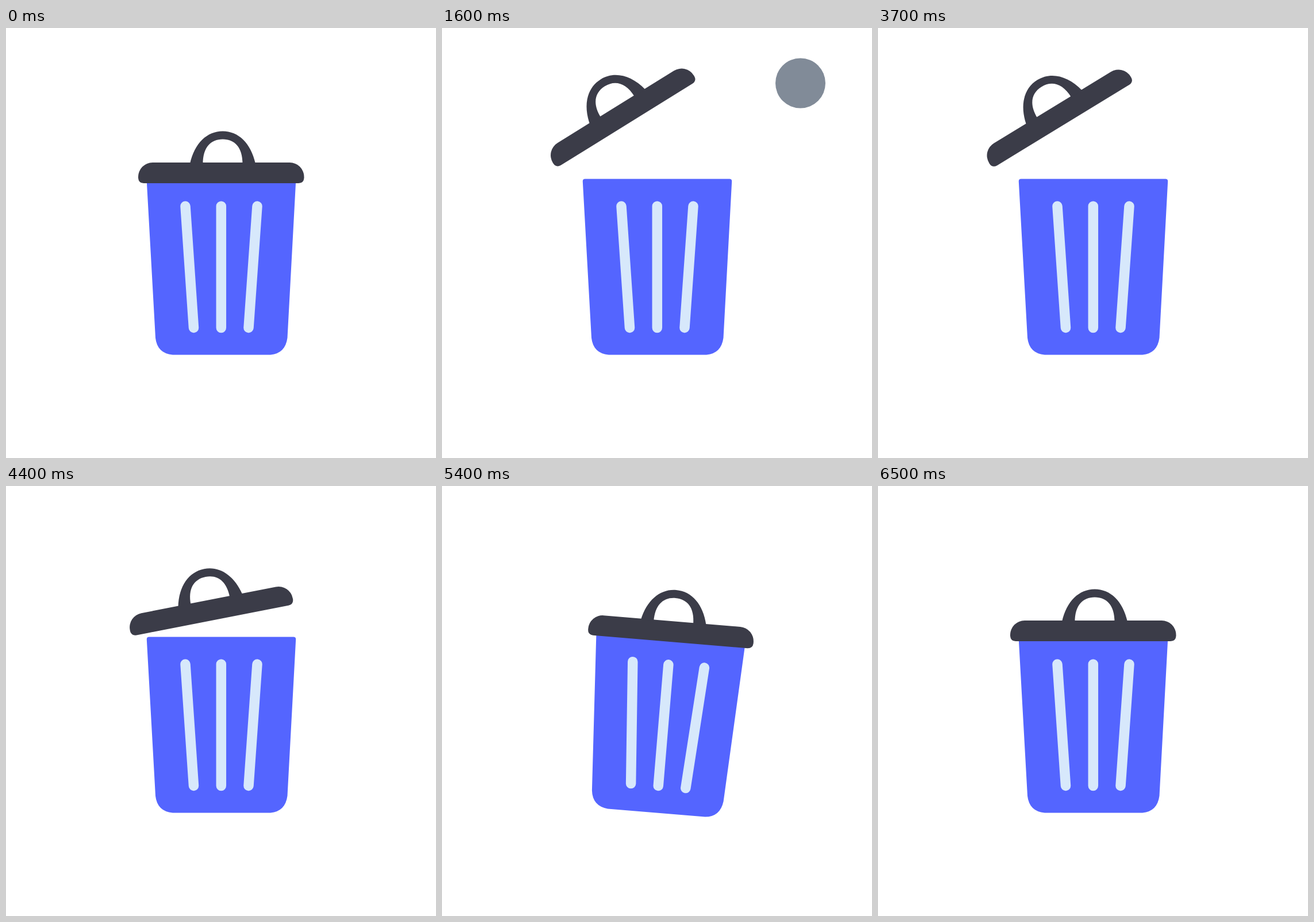
An HTML page for the animation above (6600 ms loop, 748 by 748 pixels).

```html
<!DOCTYPE html>
<html lang="en">
<head>
<meta charset="utf-8">
<title>Bin</title>
<style>
  html, body { margin: 0; width: 100%; height: 100%; overflow: hidden; background: #fff; }
  svg { display: block; width: 100%; height: 100%; }
</style>
</head>
<body>
<svg viewBox="0 0 748 748">
  <path id="throw" d="M623.5 96C520 108 412 170 374 355" fill="none"/>
  <circle id="ball" r="43.5" fill="#818b98"/>
  <g id="bin">
    <path fill="#5465ff" d="M249 262.5H500Q504.500 262.500 504.200 267L489.500 539Q486 566 460 568.500H290Q263 566 260 539L244.800 267Q244.500 262.500 249 262.500Z"/>
    <path stroke="#d7e8fb" stroke-width="17.500" stroke-linecap="round" d="M312 310L326.500 521.500M374.300 310V521.500M437 310L422 521.500"/>
    <g id="lid" fill="#3b3c48">
      <path d="M255 234H493.500A25 25 0 0 1 518.500 259V261Q518 269.500 509 270H239.500Q230.500 269.500 230 261V259A25 25 0 0 1 255 234Z"/>
      <path d="M320 236C328 200 350 179.500 377 179.500S426 200 434 236H411.500C411.500 208 398 193.500 377 193.500S342.500 208 342.500 236Z"/>
    </g>
  </g>
</svg>
<script>
const LOOP = 6600, STEP = 100;
const [path, ball, bin, lid] = ['throw', 'ball', 'bin', 'lid'].map(id => document.getElementById(id));
const pathLength = path.getTotalLength();

// Horizontal-tangent Bezier easing; x1 and x2 are its control positions.
function ease(t, x1 = 1 / 3, x2 = 2 / 3) {
  if (t <= 0) return 0;
  if (t >= 1) return 1;
  let low = 0, high = 1;
  for (let i = 0; i < 24; i++) {
    const s = (low + high) / 2, r = 1 - s;
    if (3 * x1 * s * r * r + 3 * x2 * s * s * r + s ** 3 < t) low = s;
    else high = s;
  }
  return low * low * (3 - 2 * low);
}

const span = (time, start, end, ...curve) => ease((time - start) / (end - start), ...curve);

// Each entry: time, angle in degrees.
const tilt = [[4700, 0], [5320, 5], [6190, -4.3], [6700, 0]];

function tiltAt(time) {
  if (time >= 6500) return 0;
  let angle = 0;
  for (let i = 1; i < tilt.length; i++) {
    const [start, from] = tilt[i - 1], [end, to] = tilt[i];
    angle += (to - from) * span(time, start, end);
  }
  return angle;
}

function draw(time) {
  const open = span(time, 85, 1675) - span(time, 3575, 5195, .33, .45);
  const dx = -48 * open - 15 * open * open;
  const dy = -106 * open + 6 * open * open;
  lid.setAttribute('transform', `translate(${dx} ${dy}) rotate(${-32 * open} 374 252)`);
  bin.setAttribute('transform', `rotate(${tiltAt(time)} 374 545)`);

  const { x, y } = path.getPointAtLength(pathLength * span(time, 1660, 3610));
  const size = time < 3200 ? span(time, 950, 1400) : 0;
  ball.setAttribute('transform', `translate(${x} ${y}) scale(${size})`);
}

const origin = performance.now();
function tick() {
  const time = (performance.now() - origin) % LOOP;
  draw(Math.floor(time / STEP) * STEP);
  requestAnimationFrame(tick);
}
tick();
</script>
</body>
</html>
```
